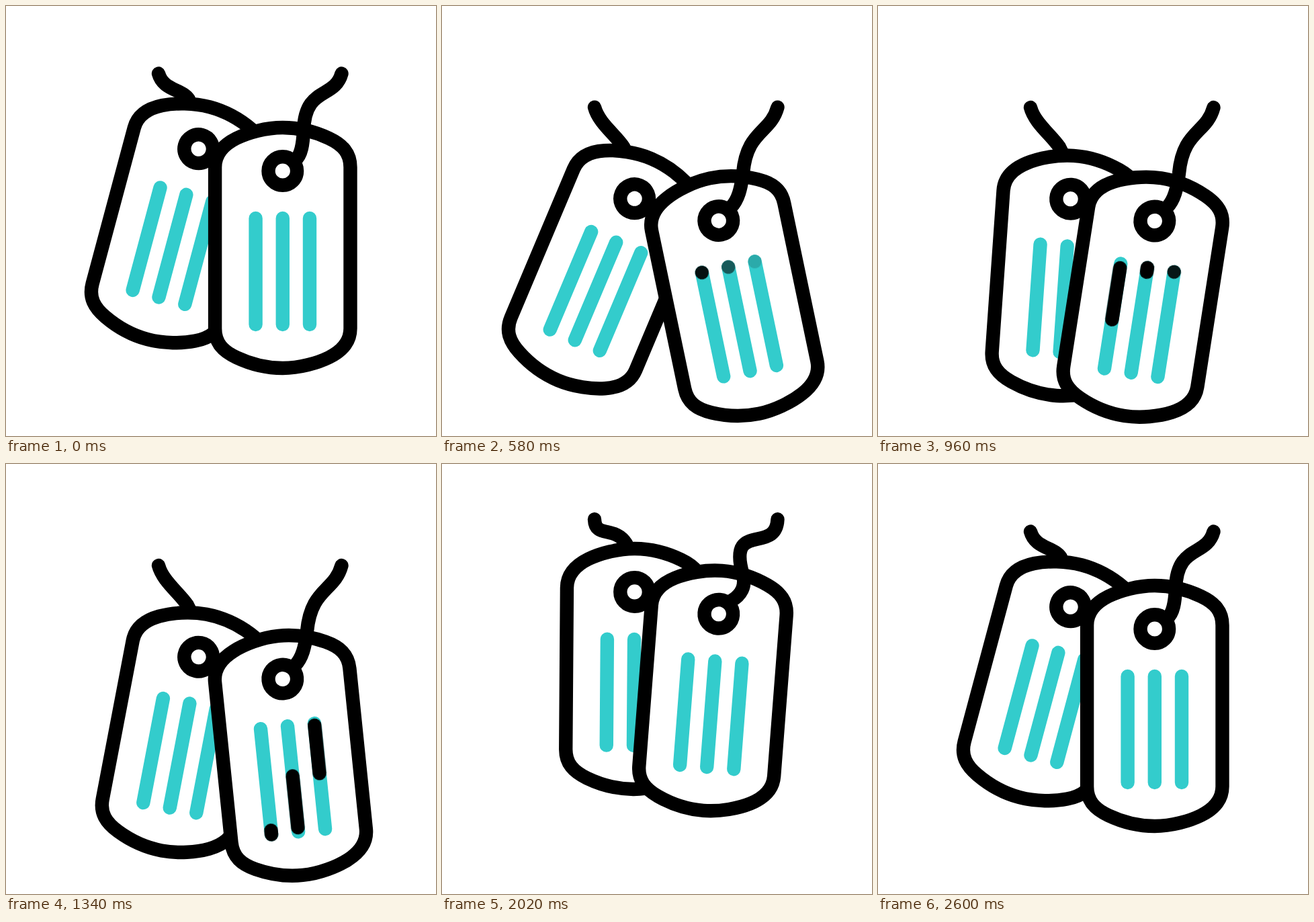
An HTML page without scripts that plays this animation: 640 px wide and 640 px high, repeating every 3000 ms.

```html
<!DOCTYPE html>
<html lang="en">
<head>
<meta charset="utf-8">
<title>Dog tags</title>
<style>
  @property --head { syntax: "<length>"; inherits: false; initial-value: 0px; }
  @property --tail { syntax: "<length>"; inherits: false; initial-value: 0px; }

  html, body { margin: 0; width: 100%; height: 100%; overflow: hidden; background: #fff; }
  svg { display: block; width: 100%; height: 100%; }

  .ink { fill: none; stroke: #000; stroke-width: 20.4; stroke-linecap: round; stroke-linejoin: round; }
  .plate, .ring { fill: #fff; }
  .bars { stroke: #3cc; }

  /* Every segment uses the same smooth ease in and out. */
  .cord, .tag, .sweep path {
    animation: 3s cubic-bezier(.333, 0, .667, 1) infinite;
  }
  .back { animation-name: drop, swing-back; }
  .front { animation-name: drop, swing-front; }
  .cord.left { animation-name: cord-left; }
  .cord.right { animation-name: cord-right; }

  @keyframes drop {
    0%, 6.667% { translate: 0 0; }
    20%, 56.667% { translate: 0 74.5px; }
    70% { translate: 0 -33.2px; }
    80%, 100% { translate: 0 0; }
  }
  @keyframes swing-back {
    0%, 10% { rotate: 15deg; }
    23.333% { rotate: 25deg; }
    33.333% { rotate: 3deg; }
    43.333% { rotate: 11deg; }
    60% { rotate: .7deg; }
    73.333% { rotate: .2deg; }
    86.667%, 100% { rotate: 15deg; }
  }
  @keyframes swing-front {
    0%, 10% { rotate: 0deg; }
    23.333% { rotate: -15deg; }
    33.333% { rotate: 10deg; }
    43.333% { rotate: -6deg; }
    60% { rotate: 1.7deg; }
    73.333% { rotate: 6.4deg; }
    86.667%, 100% { rotate: 0deg; }
  }
  @keyframes cord-left {
    0%, 6.667%, 80%, 100% { d: path("M227 100.5C234 126 262 123 272 139L276 150"); }
    20%, 56.667% { d: path("M227 151C233 174 258 192 270 210L276 222"); }
    70% { d: path("M227 74.5C227.5 104 257 80 274.5 108L278 118"); }
  }
  @keyframes cord-right {
    0%, 6.667%, 80%, 100% { d: path("M499.5 100.5C489 139 445 119 443 185C442 205 440 222 430 230"); }
    20%, 56.667% { d: path("M499.5 151C489 190 454 185 448 249C445 272 441 289 430 300"); }
    70% { d: path("M499.5 74.5C498 129 422 72 447.5 154C454 172 445.5 185 430 193"); }
  }

  /* A black stroke runs down each bar; its tail follows 200 ms behind. */
  .sweep path {
    --wait: calc(var(--i) * 200ms);
    opacity: 0;
    stroke-dasharray: calc(var(--head) - var(--tail)) 999px;
    stroke-dashoffset: calc(0px - var(--tail));
    animation-name: head, tail, show;
    animation-delay: var(--wait), calc(var(--wait) + 200ms), var(--wait);
  }
  @keyframes head {
    0%, 23.333% { --head: 0px; }
    40%, 100% { --head: 158px; }
  }
  @keyframes tail {
    0%, 23.333% { --tail: 0px; }
    40%, 100% { --tail: 158px; }
  }
  @keyframes show {
    0%, 46.6% { animation-timing-function: step-end; }
    0% { opacity: 0; }
    23.4% { opacity: 1; animation-timing-function: step-end; }
    46.6%, 100% { opacity: 0; }
  }
</style>
</head>
<body>
<svg viewBox="0 0 640 640">
  <defs>
    <g id="tag">
      <path class="plate" d="M-100.7 -5.5C-100.7 -27 -86 -40 -69 -48.5S-25 -64.5 0 -64.5 49 -58 69 -48.5 100.7 -27 100.7 -5.5V234.5C100.7 256 86 269 69 277.5S25 293.5 0 293.5 -49 287 -69 277.5 -100.7 256 -100.7 234.5Z"/>
      <path class="bars" d="M-40.2 70.5v158M0 70.5v158M40.2 70.5v158"/>
      <circle class="ring" r="21.3"/>
    </g>
  </defs>
  <g class="ink">
    <path class="cord left" d="M227 100.5C234 126 262 123 272 139L276 150"/>
    <g transform="translate(286.6 212.7)">
      <g class="tag back"><use href="#tag"/></g>
    </g>
    <g transform="translate(411.8 245.5)">
      <g class="tag front">
        <use href="#tag"/>
        <g class="sweep">
          <path style="--i:0" d="M-40.2 70.5v158"/>
          <path style="--i:1" d="M0 70.5v158"/>
          <path style="--i:2" d="M40.2 70.5v158"/>
        </g>
      </g>
    </g>
    <path class="cord right" d="M499.5 100.5C489 139 445 119 443 185C442 205 440 222 430 230"/>
  </g>
</svg>
</body>
</html>
```
